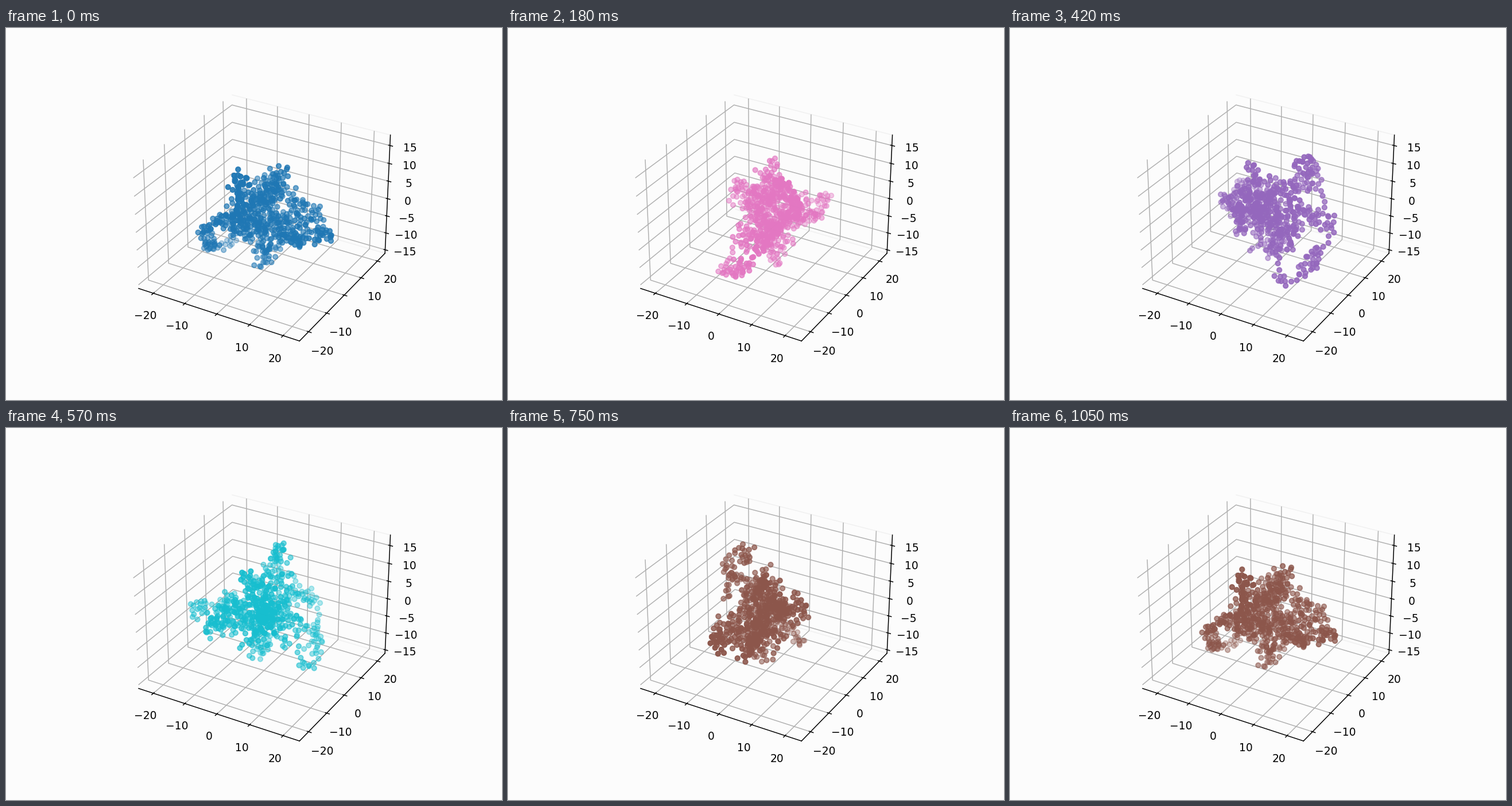
A matplotlib script that plays this animation: 864x648 px, repeating every 1.08 s.

```python
import numpy as np
import matplotlib.pyplot as plt
from matplotlib.animation import FuncAnimation

FRAMES = 36
STEP = 1.7
COUNT = 600
PAPER = "#fcfcfc"

# Ends of the main branches as seen from the camera: right, back, up
TIPS = np.array([
    (19, -10.5, -1.4), (15.6, -2.8, -6), (15.6, 0, -0.7), (10, -12.4, -2.3),
    (-0.3, -4.5, -14.4), (-17.3, 0.6, -11), (-12.2, 8.6, -14.3),
    (-17, -7, -1.6), (-7.6, -8.8, 14.6), (-7, -13.3, 9.9),
    (4.5, 1.2, 12.3), (3, 11.1, 4.2),
])


def turn(points, angle):
    """Rotate points about the z axis."""
    c, s = np.cos(angle), np.sin(angle)
    x, y, z = points.T
    return np.column_stack([c * x - s * y, s * x + c * y, z])


def unit(v):
    return v / np.linalg.norm(v)


def grow(tips, rng):
    """Aggregate with long branches to the tips and a bushy core."""
    nodes = [np.zeros(3)]

    def nearest(p):
        dist = np.linalg.norm(np.array(nodes) - p, axis=1)
        k = dist.argmin()
        return nodes[k], dist[k]

    def extend(pos, goal, wobble):
        return pos + STEP * unit(unit(goal - pos) + wobble * rng.normal(size=3))

    for tip in sorted(tips, key=np.linalg.norm):
        pos, gap = nearest(tip)
        while gap > STEP:
            pos = extend(pos, tip, 0.45)
            nodes.append(pos)
            gap = np.linalg.norm(tip - pos)

    while len(nodes) < COUNT:
        along = rng.uniform(0, 0.95)
        spread = 5.5 * (1 - along)
        goal = along * rng.choice(tips) + spread * rng.normal(size=3)
        child = extend(nearest(goal)[0], goal, 0.3)
        if nearest(child)[1] > 0.6 * STEP:
            nodes.append(child)
    return np.array(nodes)


tips = turn(TIPS, np.pi / 6) + (0, 0, 0.95)
cluster = grow(tips, np.random.default_rng(4))

fig = plt.figure(figsize=(6.4, 4.8), dpi=135, facecolor=PAPER)
ax = fig.add_subplot(projection="3d", facecolor=PAPER)
ax.set(xlim=(-24.78, 24.83), ylim=(-24.83, 24.78), zlim=(-16.05, 17.9),
       xticks=range(-20, 21, 10), yticks=range(-20, 21, 10),
       zticks=range(-15, 16, 5))
ax.xaxis.pane.set_visible(False)
ax.zaxis.pane.set_visible(False)
ax.yaxis.pane.set(fill=False, edgecolor="#e6e6e6", linewidth=0.8)


def update(i):
    for old in list(ax.collections):
        old.remove()
    points = turn(cluster, 2 * np.pi * i / (FRAMES - 1))
    return [ax.scatter(*points.T, color=f"C{i % 10}")]


anim = FuncAnimation(fig, update, frames=FRAMES, interval=30,
                     init_func=lambda: [], repeat=True, repeat_delay=0)
plt.show()
```
